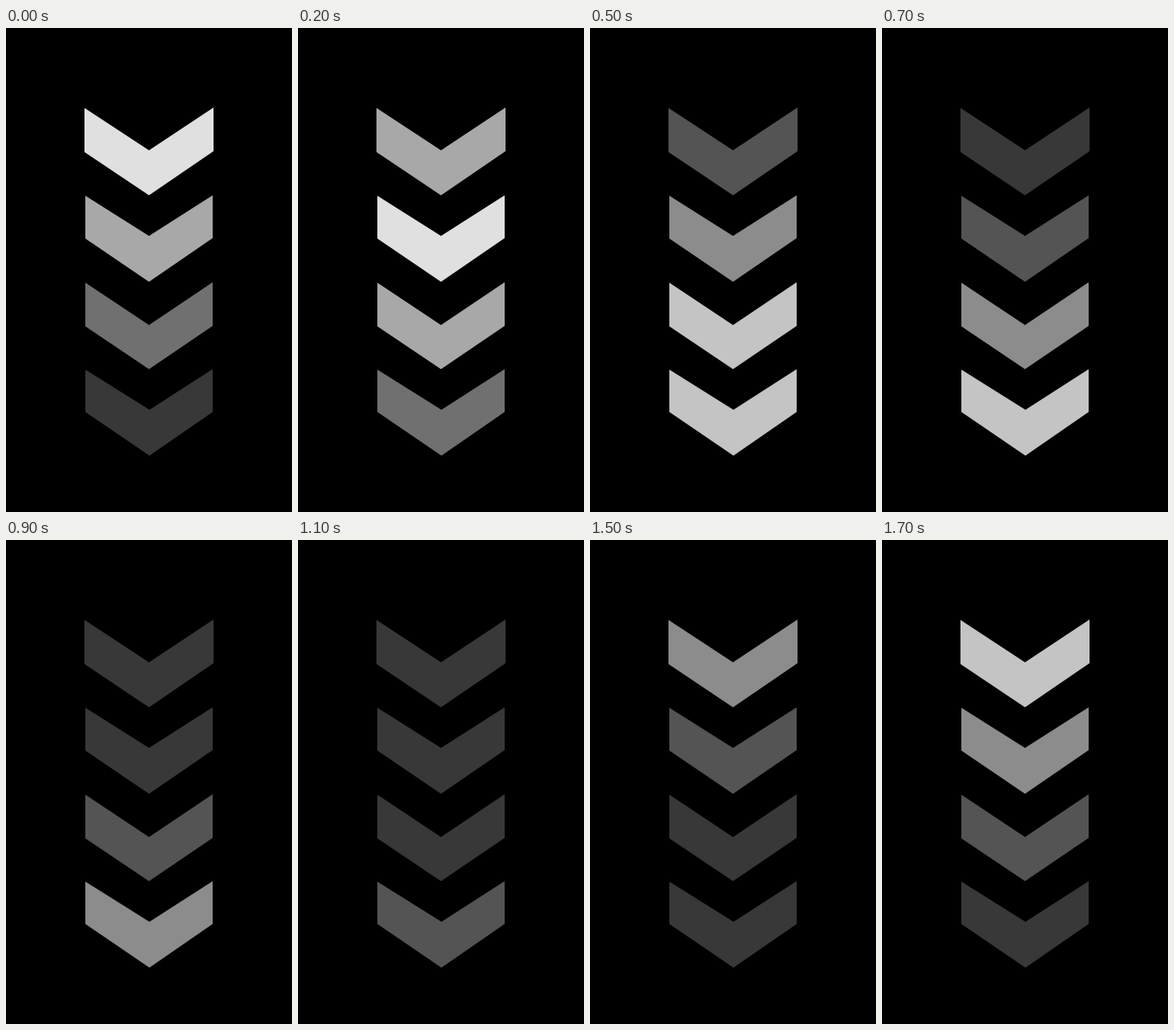
Animation, 328 px wide and 554 px high, one loop 1.8 s. Source, as an HTML page without scripts:

```html
<!DOCTYPE html>
<html lang="en">
<head>
<meta charset="utf-8">
<title>Chevrons</title>
<style>
  html, body { margin: 0; width: 100%; height: 100%; overflow: hidden; background: #000; }
  svg { display: block; width: 100vw; height: 100vh; }
  .chevron { fill: #fff; animation: pulse 1800ms infinite; animation-delay: var(--delay, 0ms); }

  /* Six hard steps down, a pause, six hard steps up. */
  @keyframes pulse {
    0% { opacity: .88; animation-timing-function: steps(6); }
    33.3% { opacity: .22; animation-timing-function: linear; }
    66.6% { opacity: .22; animation-timing-function: steps(6); }
    100% { opacity: .88; }
  }
</style>
</head>
<body>
<svg viewBox="0 0 328 554">
  <path class="chevron" d="M90 91.5 164 140 238 91V141L164 191.5 90 142Z"/>
  <path class="chevron" style="--delay: -1600ms" d="M91 192 164 238 237 191.5V240.5L164 290.5 91 241Z"/>
  <path class="chevron" style="--delay: -1400ms" d="M91 291.5 164 340 237 291V341L164 390.5 91 341.5Z"/>
  <path class="chevron" style="--delay: -1200ms" d="M91 391 164.5 437 237 390.5V439.5L164.5 489.5 91 439.5Z"/>
</svg>
</body>
</html>
```
